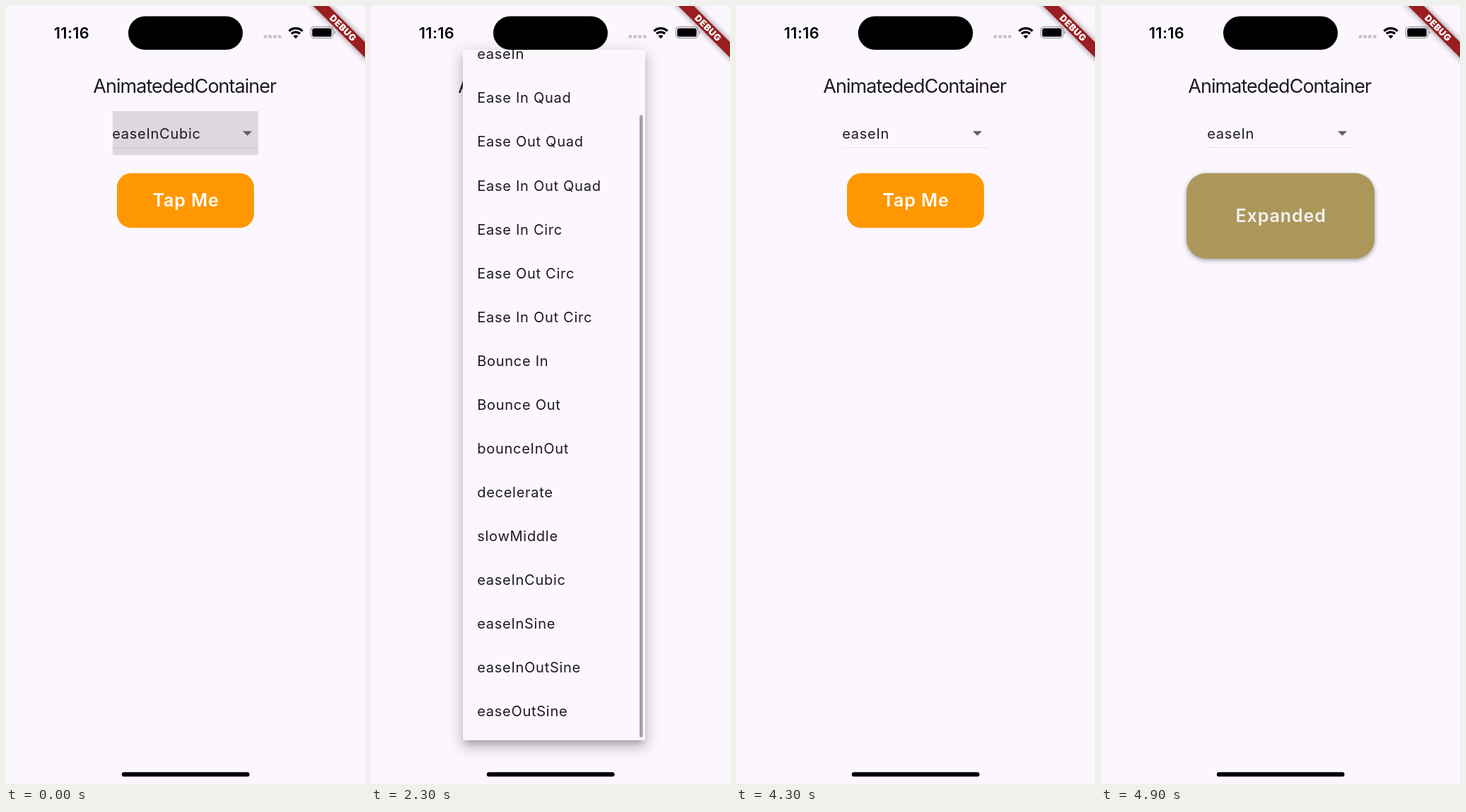
These frames come from a looping animation (508 px wide and 1102 px high, 5000 ms). An HTML page:

```html
<!DOCTYPE html>
<html lang="en">
<head>
<meta charset="utf-8">
<title>Animated container</title>
<style>
  html, body { margin: 0; width: 100%; height: 100%; overflow: hidden; background: #fcf7fe; }
  svg { display: block; width: 100vw; height: 100vh; }
  text { font-family: Inter, Roboto, sans-serif; font-optical-sizing: none; fill: #1d1b20; white-space: pre; }
  .title { font-size: 27px; letter-spacing: -.97px; }
  .body { font-size: 20.1px; letter-spacing: .68px; }
  .label { font-size: 25.1px; font-weight: 600; letter-spacing: .85px; text-anchor: middle; }
  .clock { font-size: 21.7px; font-weight: 600; letter-spacing: .4px; text-anchor: middle; fill: #000; }
  .debug { font-size: 12.9px; font-weight: 900; letter-spacing: .5px; text-anchor: middle; fill: #fff; }
</style>
</head>
<body>
<svg viewBox="0 0 508 1102">
  <defs>
    <filter id="blur1" filterUnits="userSpaceOnUse" x="60" y="0" width="400" height="1102"><feGaussianBlur stdDeviation="4.4"/></filter>
    <filter id="blur2" filterUnits="userSpaceOnUse" x="60" y="0" width="400" height="1102"><feGaussianBlur stdDeviation="8.1"/></filter>
    <filter id="blur3" filterUnits="userSpaceOnUse" x="60" y="0" width="400" height="1102"><feGaussianBlur stdDeviation="11.1"/></filter>
    <filter id="buttonBlur" filterUnits="userSpaceOnUse" x="60" y="200" width="400" height="300"><feGaussianBlur id="buttonSigma"/></filter>
    <filter id="bannerBlur" filterUnits="userSpaceOnUse" x="-100" y="0" width="200" height="90"><feGaussianBlur stdDeviation="4.4"/></filter>
    <clipPath id="menuClip"><rect id="clipRect"/></clipPath>
  </defs>

  <rect width="508" height="1102" fill="#fcf7fe"/>
  <text class="title" x="123.3" y="122.8">AnimatededContainer</text>

  <path d="M151 200.5H357" stroke="#e8e3ea"/>
  <rect id="highlight" x="151" y="149" width="206" height="62"/>
  <circle id="ripple" cx="294" cy="180" r="31" fill="#dcdedc" opacity=".45"/>
  <text id="choice" class="body" x="150.2" y="187.8"></text>
  <path d="M335 177.2h13l-6.5 6.5z" fill="#625f65"/>

  <rect id="buttonShadow" fill-opacity=".38" filter="url(#buttonBlur)"/>
  <rect id="button"/>
  <text id="label" class="label" x="254.6"></text>

  <g id="menu">
    <rect class="shadow" fill-opacity=".2" filter="url(#blur1)"/>
    <rect class="shadow" fill-opacity=".14" filter="url(#blur2)"/>
    <rect class="shadow" fill-opacity=".12" filter="url(#blur3)"/>
    <rect id="panel" rx="2.6" fill="#fcf6fd"/>
    <g clip-path="url(#menuClip)">
      <g id="items"></g>
      <rect id="scrollbar" x="380" y="154.5" width="4.6" height="881.5" rx="2.3" fill="#a3a0a6"/>
    </g>
  </g>

  <text class="clock" x="92.9" y="45.8">11:16</text>
  <rect id="island"/>
  <g fill="#c9c4cc">
    <rect x="364.5" y="41" width="5" height="4.8" rx="1.8"/>
    <rect x="371.2" y="41" width="5" height="4.8" rx="1.8"/>
    <rect x="378" y="41" width="5" height="4.8" rx="1.8"/>
    <rect x="384.8" y="41" width="5" height="4.8" rx="1.8"/>
  </g>
  <g fill="none" stroke="#000" stroke-width="3.4">
    <path d="M400.5 35.6a13.4 13.4 0 0 1 19 0M404 39.3a8.6 8.6 0 0 1 12 0"/>
    <path d="M410 46.2l-3.5-3.6a4.9 4.9 0 0 1 7 0z" fill="#000" stroke="none"/>
  </g>
  <rect x="431.2" y="29.3" width="31.6" height="16.4" rx="5" fill="none" stroke="#a5a0a8" stroke-width="1.3"/>
  <rect x="433.3" y="31.4" width="27.4" height="12.2" rx="3.2"/>
  <path d="M464.4 35v5.2q1.8-.8 1.8-2.6t-1.8-2.6z" fill="#a5a0a8"/>

  <g transform="translate(508 0) rotate(45)">
    <rect x="-60" y="36.2" width="120" height="15.5" fill-opacity=".5" filter="url(#bannerBlur)"/>
    <rect x="-60" y="36.2" width="120" height="15.5" fill="#9a1d21"/>
    <text class="debug" x=".2" y="48.6">DEBUG</text>
  </g>
  <rect x="163.8" y="1085.3" width="180.8" height="6.2" rx="3.1"/>
</svg>

<script>
const LOOP = 5000, STEP = 100;
const PX = 508 / 393;              // device pixels per logical pixel
const ROW = 48 * PX;
const MENU = { x: 130, y: 62, w: 258, h: 978 };
const SELECTED = 13, COUNT = 17;   // the first entry is scrolled out of view
const NAMES = ["easeIn", "Ease In Quad", "Ease Out Quad", "Ease In Out Quad", "Ease In Circ",
  "Ease Out Circ", "Ease In Out Circ", "Bounce In", "Bounce Out", "bounceInOut", "decelerate",
  "slowMiddle", "easeInCubic", "easeInSine", "easeInOutSine", "easeOutSine"];
const MENU_OPEN = 1830, MENU_CLOSE = 3600, TAP = 4318, GROW = 1056;
const ORANGE = [255, 152, 0], BLUE = [33, 150, 243];

const $ = id => document.getElementById(id);
const set = (el, attrs) => { for (const k in attrs) el.setAttribute(k, attrs[k]); };
const box = (el, x, y, width, height, rx = 0) => set(el, { x, y, width, height, rx });
const lerp = (a, b, p) => a + (b - a) * p;
const mix = (a, b, p) => `rgb(${a.map((v, i) => Math.round(lerp(v, b[i], p)))})`;
const interval = (t, from, to) => Math.min(1, Math.max(0, (t - from) / (to - from)));

const items = NAMES.map((name, i) => {
  const el = document.createElementNS("http://www.w3.org/2000/svg", "text");
  set(el, { class: "body", x: 150.2, y: 75.4 + i * ROW });
  el.textContent = name;
  return $("items").appendChild(el);
});
const shadows = [...document.querySelectorAll(".shadow")];
const SHADOW_SHAPES = [[-3, 5], [1, 8], [2, 3]];   // spread, vertical offset

// cubic-bezier(.42, 0, 1, 1), solved by bisection
function easeIn(x) {
  let lo = 0, hi = 1;
  for (let i = 0; i < 24; i++) {
    const s = (lo + hi) / 2, r = 1 - s;
    if (1.26 * r * r * s + 3 * r * s * s + s ** 3 < x) lo = s; else hi = s;
  }
  return lo * lo * (3 - 2 * lo);
}

function drawDropdown(t) {
  const strength = t < 1800 ? .125 : .092 * (1 - interval(t, 1800, 2000));
  set($("highlight"), { "fill-opacity": strength });
  $("ripple").style.display = t >= 1800 && t < 1900 ? "" : "none";
  $("choice").textContent = t < MENU_CLOSE ? "easeInCubic" : "easeIn";
}

function drawMenu(t) {
  const shown = t > MENU_OPEN && t < MENU_CLOSE;
  $("menu").style.display = shown ? "" : "none";
  if (!shown) return;
  const p = interval(t, MENU_OPEN, MENU_OPEN + 300);
  const size = interval(p, .25, .5);
  const start = (8 + 48 * SELECTED) * PX;
  const top = lerp(start, 0, size), height = lerp(start + ROW, MENU.h, size) - top;
  const y = MENU.y + top;
  set($("menu"), { opacity: interval(p, 0, .25) });
  box($("panel"), MENU.x, y, MENU.w, height, 2.6);
  box($("clipRect"), MENU.x, y, MENU.w, height);
  shadows.forEach((el, i) => {
    const [spread, drop] = SHADOW_SHAPES[i].map(v => v * PX);
    box(el, MENU.x - spread, y - spread + drop, MENU.w + 2 * spread, height + 2 * spread, 2.6);
  });
  const unit = .5 / (COUNT + 1.5);
  items.forEach((el, i) => {
    const from = .5 + (i + 2) * unit;
    set(el, { opacity: i + 1 === SELECTED ? 1 : interval(p, from, from + 1.5 * unit) });
  });
  set($("scrollbar"), { opacity: interval(t, 1900, 2250) });
}

function drawIsland(t) {
  const u = Math.max(0, (t - 3457) / 143);
  const swell = 5.2 * u * Math.exp(1 - u), rise = swell * .25;
  box($("island"), 173 - swell, 14.5 - rise, 162 + 2 * swell, 47.5 + 2 * rise, 23.75 + rise);
}

function drawButton(t) {
  const p = easeIn(interval(t, TAP, TAP + GROW));
  const w = lerp(150, 300, p) * PX, h = lerp(60, 150, p) * PX;
  const x = 254 - w / 2, y = 236.8, r = lerp(20, 40, p);
  box($("button"), x, y, w, h, r);
  set($("button"), { fill: mix(ORANGE, BLUE, p) });
  box($("buttonShadow"), x, y + 5 * p * PX, w, h, r);
  $("buttonShadow").style.display = p > 0 ? "" : "none";
  set($("buttonSigma"), { stdDeviation: (10 * p * .577 + .5) * PX });
  set($("label"), { y: y + h / 2 + 8.8 });
  $("label").style.fill = mix([255, 255, 255], [222, 218, 224], p);
  $("label").textContent = t < TAP ? "Tap Me" : "Expanded";
}

function draw(now) {
  const t = Math.floor((now % LOOP) / STEP) * STEP;   // ten pictures a second
  drawDropdown(t);
  drawMenu(t);
  drawIsland(t);
  drawButton(t);
}

function tick(now) {
  draw(now);
  requestAnimationFrame(tick);
}
draw(0);
requestAnimationFrame(tick);
</script>
</body>
</html>
```
